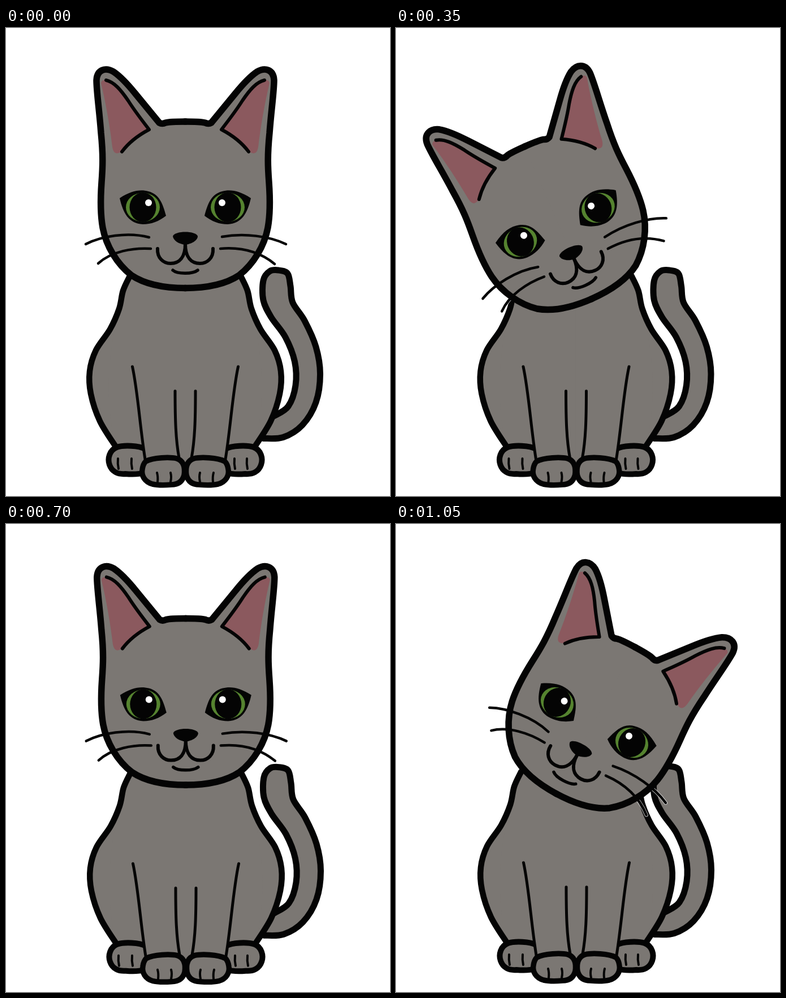
These frames come from a looping animation (679x825 px, 1400 ms). An HTML page with a canvas:

```html
<!DOCTYPE html>
<html lang="en">
<head>
<meta charset="utf-8">
<title>Cat tilting its head</title>
<style>
  html, body { margin: 0; width: 100%; height: 100%; overflow: hidden; background: #fff; }
  canvas { display: block; }
</style>
</head>
<body>
<canvas id="stage" width="679" height="825"></canvas>
<script>
const ctx = document.getElementById('stage').getContext('2d');
const FUR = '#7b7773', INK = '#040404', PINK = '#8b595e', GREEN = '#55832f';
const AXIS = 317, EYE_LINE = 316, HOLD = 350;

// Where the body sits, and where the head's pivot goes with its tilt in degrees
const poses = [
  { body: [0, 0], head: [317, 316], tilt: 0 },
  { body: [1.5, 0], head: [288.7, 347], tilt: -23.6 },
  { body: [1, 1.7], head: [317.8, 317.6], tilt: 0 },
  { body: [2, 0], head: [351, 350], tilt: 28.3 }
];

// Smooth curve through a few points
function spline(p) {
  const path = new Path2D();
  path.moveTo(...p[0]);
  for (let i = 0; i < p.length - 1; i++) {
    const a = p[Math.max(i - 1, 0)], b = p[i], c = p[i + 1], d = p[Math.min(i + 2, p.length - 1)];
    path.bezierCurveTo(
      b[0] + (c[0] - a[0]) / 6, b[1] + (c[1] - a[1]) / 6,
      c[0] - (d[0] - b[0]) / 6, c[1] - (d[1] - b[1]) / 6, c[0], c[1]);
  }
  return path;
}

const tail = spline([
  [474, 684], [499, 667], [512, 630], [510.5, 588], [494, 545], [469, 510], [455, 480],
  [455, 445], [466, 429], [482, 427], [498, 433], [503, 455], [507, 484], [528, 516],
  [548, 562], [555.5, 610], [548, 660], [524, 700], [490, 721.5], [455, 723.5]
]);

// Left halves; the right side mirrors them
const flank = spline([
  [219, 437], [207, 463], [200, 495], [184, 531], [159, 568], [148, 605],
  [150, 645], [166, 693], [194, 738]
]);
const belly = new Path2D('M194 738 Q160 600 219 437 L318 430 V765 H240 Z');
const backPaw = new Path2D('M246 742 C235 736 208 735 196 739 C183 744 179 759 183 770 C187 782 198 787 211 786 C222 787 234 787 245 784');
const frontPaw = new Path2D('M247 764 C260 757 290 756 302 759 C314 763 317 774 315 788 C312 800 304 805 292 805 C280 806 268 806 259 804 C245 800 239 789 241 778 C242 771 244 767 247 764 Z');
const legLine = new Path2D('M223.5 597 C233 640 237 705 246 760');
const innerLeg = new Path2D('M299 640 C299 690 300 725 306 758');
const frontToes = new Path2D('M267 784 Q269 791 268 800 M291 784 Q293 791 291 800');

const skull = new Path2D('M318 165 C304 165 290 165 282 167 Q276 170 271 167 L229 116 C216 100 202 85 190 77 C176 69 161 73 160 92 C160 112 165 145 168 185 C172 225 171 245 169 272 C167 300 167 330 171 352 C177 384 196 416 222 436 C249 454 283 458.5 318 458.5');
const earPink = new Path2D('M168 97 Q169 90 181 92 C202 107 231 153 251 180 C228 192 213 206 204 218 Q191 227 188 210 C184 175 177 135 168 97 Z');
const earLine = new Path2D('M177 92 C191 95 203 109 216 128 C228 147 240 162 253 179 C234 189 217 202 205 218');
const eye = new Path2D('M201 300 C221 287 237 284 252 288 C271 293 277 309 283 331 C270 341 257 346 242 346 C217 345 207 326 201 300 Z');
const mouth = new Path2D('M268 389 C267 405 278 415 291 415 C306 415 317 405 317 380');

const nose = new Path2D('M295 367 C298 357 336 357 339 367 C339 375 327 381 317 382 C306 381 296 375 295 367 Z');
const smile = new Path2D('M295 427 C303 434 330 434 339 427');
const whiskers = new Path2D(
  'M141 381 C168 367 215 359 253 369 M163 415 C186 394 224 387 256 389' +
  'M495 381 C466 367 422 361 382 368 M475 416 C448 394 414 386 379 389');

function fill(path, color) {
  ctx.fillStyle = color;
  ctx.fill(path);
}

function line(path, width, color = INK) {
  ctx.strokeStyle = color;
  ctx.lineWidth = width;
  ctx.stroke(path);
}

function oval(x, y, rx, ry, color) {
  const path = new Path2D();
  path.ellipse(x, y, rx, ry, 0, 0, 2 * Math.PI);
  fill(path, color);
}

function bothSides(draw) {
  draw();
  ctx.save();
  ctx.translate(2 * AXIS, 0);
  ctx.scale(-1, 1);
  draw();
  ctx.restore();
}

function toe(x) {
  line(new Path2D(`M${x} 759 Q${x - 1} 768 ${x + 1} 777`), 4);
}

function drawBody() {
  fill(tail, FUR);
  line(tail, 11);
  bothSides(() => {
    fill(flank, FUR);
    fill(belly, FUR);
  });
  bothSides(() => line(flank, 10.5));
  bothSides(() => {
    fill(backPaw, FUR);
    line(backPaw, 10);
  });
  // Clear the back paws' inner ends from behind the front legs
  bothSides(() => fill(new Path2D('M232 650 L318 650 V765 H246 Z'), FUR));
  [198, 222, 404, 426].forEach(toe);
  bothSides(() => {
    line(legLine, 5);
    line(innerLeg, 5);
    fill(frontPaw, FUR);
    line(frontPaw, 9.5);
    line(frontToes, 4);
  });
}

function drawEye() {
  fill(eye, INK);
  oval(242, 316, 30, 25.5, GREEN);
  oval(242, 316, 23.5, 26, INK);
  oval(252, 308, 6, 6, '#fff');
}

function drawHead() {
  line(whiskers, 6.5, 'rgba(255,255,255,.7)');
  bothSides(() => fill(skull, FUR));
  bothSides(() => {
    fill(earPink, PINK);
    line(skull, 11.5);
    line(earLine, 6);
    drawEye();
    line(mouth, 6);
  });
  line(whiskers, 4.5);
  fill(nose, INK);
  line(smile, 5.5);
}

function draw(time) {
  const pose = poses[Math.floor(time / HOLD) % poses.length];
  ctx.fillStyle = '#fff';
  ctx.fillRect(0, 0, 679, 825);
  ctx.lineCap = ctx.lineJoin = 'round';

  ctx.save();
  ctx.translate(...pose.body);
  drawBody();
  ctx.restore();

  ctx.save();
  ctx.translate(...pose.head);
  ctx.rotate(pose.tilt * Math.PI / 180);
  ctx.translate(-AXIS, -EYE_LINE);
  drawHead();
  ctx.restore();
}

const start = performance.now();
function tick() {
  draw(performance.now() - start);
  requestAnimationFrame(tick);
}
tick();
</script>
</body>
</html>
```
